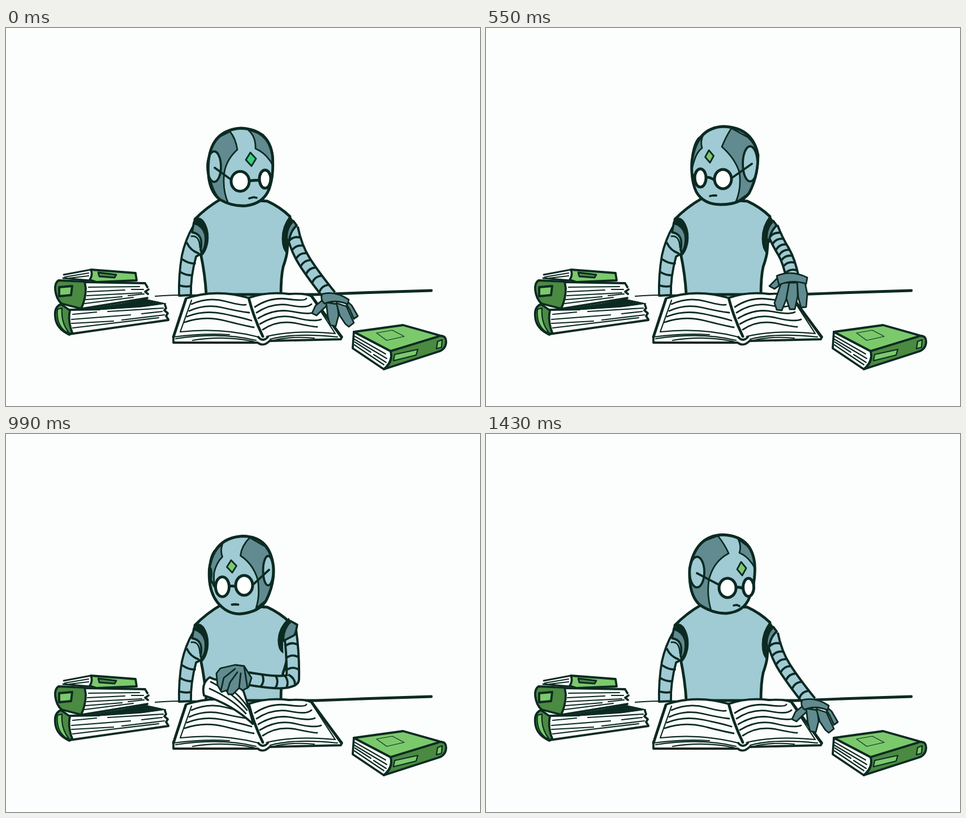
An HTML page that plays this animation: 838x668 px, repeating every 1.54 s.

```html
<!DOCTYPE html>
<html lang="en">
<head>
<meta charset="utf-8">
<title>Robot reading</title>
<style>
html, body { margin: 0; width: 100%; height: 100%; overflow: hidden; background: #fcfefd; }
svg { display: block; width: 100%; height: 100%; }
path, ellipse { fill: none; stroke: #0c2a22; stroke-width: 3.8; stroke-linecap: round; stroke-linejoin: round; }
.blue { fill: #a0cbd4; }
.teal { fill: #618b90; }
.lime { fill: #7cc96c; }
.moss { fill: #4b8a41; }
.paper { fill: #fcfefd; }
.lens { fill: #fff; stroke-width: 5; }
.ink { fill: #0c2a22; stroke-width: 1; }
.mid { stroke-width: 2.8; }
.fine { stroke-width: 2.2; }
.hair { stroke-width: 1.2; }
.bold { stroke-width: 4.8; }
.bare { stroke: none; }
.skin { stroke: #a0cbd4; }
</style>
</head>
<body>
<svg viewBox="0 0 838 668">
  <path class="fine" d="M264,474Q300,471 357,472"/>
  <path class="bold" d="M486,471L548,471Q650,467 752,464"/>

  <g id="stack">
    <path class="paper bare" d="M96,488L245,480L284,488L287,516L112,541L88,515Z"/>
    <path class="ink" d="M140,497L205,487L246,479L283,487L240,493L165,498Z"/>
    <path class="moss" d="M97,488Q85,493 87,510Q88,531 112,542L117,538Q109,518 113,499Z"/>
    <path class="lime fine" d="M91,497Q88,524 106,537L111,538Q97,521 99,495Z"/>
    <path d="M112,541L287,516M113,498L165,497M281,489L283,495L280,499L286,504L283,509L287,515"/>
    <path class="fine" d="M118,506L160,502M180,501L278,495M116,515L220,507M240,505L276,501M116,522L190,518M205,516L280,507M118,530L270,512"/>
    <path class="paper bare" d="M140,449L251,452L249,477L134,495Z"/>
    <path class="moss" d="M93,446Q86,450 87,463Q89,479 98,487L133,496Q141,478 141,460L139,448Z"/>
    <path class="lime" d="M94,458L117,456L115,472L94,474Z"/>
    <path d="M139,449L246,451M134,496L250,477M247,453L250,458M252,462L246,466L251,470"/>
    <path class="fine" d="M146,458L236,457M144,466L210,463M222,462L243,462M143,473L240,468M141,480L205,475M216,473L244,470M139,487L225,476"/>
    <path class="paper bare" d="M102,436L150,427L149,445L104,443Z"/>
    <path class="mid" d="M102,436L150,427M101,442L148,446"/>
    <path class="fine" d="M104,440L146,433M112,442L146,438"/>
    <path class="lime" d="M150,427L229,433L231,446L160,449L148,445Q154,436 150,427Z"/>
    <path class="moss mid" d="M163,432L195,436L192,441L165,439Z"/>
  </g>

  <g id="side-book">
    <path class="paper" d="M615,537L680,571Q685,588 668,603L613,566Z"/>
    <path class="fine" d="M617,545L671,576M616,550L673,584M617,555L645,573M650,577L672,591M616,560L668,595"/>
    <path class="lime" d="M615,537L702,525L769,544L680,571Z"/>
    <path class="hair" d="M655,539L683,534L704,545L673,552Z"/>
    <path class="moss" d="M680,571L768,544Q779,544 778,556Q777,568 764,572L668,603Q685,590 680,571Z"/>
    <path class="lime fine" d="M687,577L728,568L725,578L685,588ZM763,554L771,551L770,564L761,567Z"/>
  </g>

  <path class="blue bold" d="M382,301Q354,317 334,338L344,398Q352,435 354,471L486,471Q486,440 490,422Q496,405 497,395L502,333Q484,316 462,306Z"/>
  <g id="rest-arm">
    <path class="blue" d="M331,350Q317,374 311,402Q305,436 306,473L327,472Q326,440 336,404L346,398Q357,380 352,360Q345,346 331,350Z"/>
    <path class="teal" d="M332,344Q352,350 354,368Q354,386 346,397L344,392Q350,364 329,361Z"/>
    <path class="mid" d="M328,368Q342,366 343,388"/>
    <path class="ink" d="M333,337Q346,331 353,347Q360,362 357,380Q354,395 347,402Q353,380 351,366Q347,350 331,346Z"/>
    <path d="M320,380Q326,393 340,398M312,409Q324,417 334,416M308,431Q317,437 328,437M307,455Q317,458 327,456"/>
  </g>

  <g id="head"></g>

  <g id="open-book">
    <path class="paper" d="M318,478Q372,460 429,477Q462,465 500,470Q532,468 541,475L594,546L592,550L466,553Q455,564 445,556L296,556L296,546Z"/>
    <path class="fine" d="M328,481L308,537Q380,529 446,546M541,477L582,540Q510,533 461,545M300,549Q380,537 442,552M330,552Q385,543 438,554M467,550Q510,538 586,546M470,553Q500,544 545,548M296,546Q350,539 395,542"/>
    <path class="bold" d="M318,479L296,546M541,475L593,546M429,477Q438,512 454,545"/>
    <path d="M446,546Q454,556 463,546"/>
    <path class="mid" d="M328,488Q358,475 388,483T424,489M324,500Q352,487 382,494T430,503M320,510Q350,498 384,505T434,517M316,520Q350,508 386,517T438,529"/>
    <path class="mid" d="M440,493Q467,475 498,479T531,478M443,503Q472,484 502,490T540,488M446,513Q475,495 506,501T546,502M449,523Q480,504 512,512T557,515M454,533Q480,515 514,522T550,528"/>
  </g>

  <g id="arm"></g>
</svg>

<script>
const TICK = 110, STEPS = 14;
const nums = s => s.match(/-?[\d.]+/g).map(Number);
const lerp = (a, b, t) => a + (b - a) * t;

// Blends the numbers of two strings that share one layout.
function mix(a, b, t) {
  const to = nums(b);
  let i = 0;
  return a.replace(/-?[\d.]+/g, n => +lerp(+n, to[i++], t).toFixed(1));
}

// outline | left patch | right patch | ears | lenses | temples | gem | mouth
const HEADS = {
  right: `M416,177Q364,180 358,235Q354,285 378,303Q400,316 425,314Q455,310 465,285Q474,260 471,225Q465,180 416,177Z
|M372,195L396,183Q406,195 409,215Q390,232 386,255Q382,285 393,310L378,303Q358,280 358,235Q360,210 372,195Z
|M454,188L428,180Q442,192 441,213Q456,220 464,231Q469,236 471,242L472,240Q473,225 470,218Q466,200 454,188Z
|368 245 12 27|471 245 0 0|414 271 16 17.5|458 267 10 16|M369,247L398,268M468,262L470,261|433 232 9 12|M430,301L438,299L443,300`,
  front: `M418,174Q366,178 363,235Q362,285 382,303Q400,316 420,316Q450,314 464,293Q481,262 479,230Q474,178 418,174Z
|M374,198L398,181Q394,197 397,213Q380,228 376,255Q374,280 382,303L374,295Q360,270 363,235Q364,212 374,198Z
|M466,196L436,178Q430,195 431,212Q452,228 458,255Q461,280 456,301L466,290Q481,262 479,230Q477,210 466,196Z
|367 245 3 21|474 243 5 24|394 268 14 17|435 267 15 17|M366,258L379,264M452,264L474,243|412 234 9 12|M411,301L415,300L420,301`,
  left: `M420,174Q372,176 364,235Q362,270 372,290Q385,312 415,312Q450,312 465,292Q481,262 481,225Q472,176 420,174Z
|M375,195L385,187Q378,200 382,212Q372,220 368,235Q366,240 365,246L364,240Q364,228 365,222Q368,204 375,195Z
|M463,193L434,177Q424,192 417,210Q440,230 448,255Q452,285 441,309L465,292Q481,262 481,225Q478,207 463,193Z
|365 245 0 0|467 240 13 31|379 265 10 16|419 267 15 17|M367,260L368,260M436,264L470,240|395 227 7.5 11|M396,297L401,296L407,296`,
  down: `M420,181Q370,183 360,235Q356,265 366,290Q380,317 408,317Q448,314 460,292Q473,262 471,235Q465,181 420,181Z
|M364,213L368,205Q365,212 369,219Q364,225 362,234Q361,238 360,242L360,238Q360,228 361,224Q362,218 364,213Z
|M455,198L428,182Q405,195 399,217Q425,232 434,260Q438,290 429,314L460,292Q473,262 471,235Q468,212 455,198Z
|361 245 0 0|458 239 12 27|373 270 10 17|408 268 15 18|M361,264L362,264M425,266L462,240|387 235 8 10|M390,300L394,299L398,300`,
  turn: `M418,180Q366,182 359,240Q358,285 380,303Q400,319 418,319Q448,316 460,296Q476,268 475,238Q470,182 418,180Z
|M372,200L397,185Q392,200 396,215Q380,230 374,255Q372,285 380,304L372,295Q357,270 359,238Q361,213 372,200Z
|M462,200L434,184Q428,200 430,213Q450,228 457,258Q460,285 455,302L464,292Q476,268 475,238Q473,215 462,200Z
|362 250 3 20|469 244 6 25|392 270 14 18|434 267 15 17|M363,258L377,266M451,264L468,240|411 233 9 12|M409,303L416,303L423,303`,
  follow: `M416,181Q368,183 361,240Q358,285 378,302Q400,317 425,317Q455,314 465,292Q476,265 473,230Q466,181 416,181Z
|M380,196L402,185Q412,195 417,208Q397,222 391,255Q388,285 398,313L378,302Q358,280 361,240Q364,215 380,196Z
|M459,197L450,191Q454,200 455,207Q463,211 467,218Q470,222 472,228L472,226Q471,216 469,213Q465,203 459,197Z
|372 245 10 27|473 245 0 0|425 269 16 17|460 265 9 16|M371,247L409,264M470,261L471,260|447 234 7 11|M439,302L443,301L448,302`,
  settle: `M418,178Q370,180 360,238Q358,285 378,302Q400,317 425,317Q457,314 466,288Q477,262 475,230Q470,180 418,178Z
|M383,190L410,180Q422,195 429,211Q402,225 394,258Q390,285 398,312L378,302Q358,280 360,238Q366,205 383,190Z
|M462,198L446,186Q452,198 448,210Q460,215 468,226Q473,231 475,238L475,234Q475,222 472,215Q468,204 462,198Z
|373 244 13 27|476 245 0 0|427 272 15 17|464 271 9.5 16|M373,246L411,266M473,266L474,265|452 238 8 12|M438,303L443,302L448,304`
};

// Two joined quadratics from shoulder to wrist.
const ARMS = {
  out: '505 353 512 388 528 413 544 438 573 474',
  near: '505 352 514 376 526 395 536 412 542 442',
  across: '501 346 500 385 496 415 490 451 380 451',
  lift: '503 348 516 395 518 452 500 437 474 413',
  lay: '505 353 509 385 520 405 532 428 556 453'
};

const HANDS = {
  out: ['M563,478L547,491L541,504L549,508L557,500L568,490Z', 'M566,485L569,510L573,525L583,527L588,508L586,488Z',
    'M584,486L590,508L600,523L606,528L615,521L602,492Z', 'M598,482L608,498L615,514L622,509L611,490L602,482Z',
    'M559,470Q582,464 606,480L604,488Q582,479 563,487Q555,480 559,470Z'],
  near: ['M520,437L501,456L510,461L524,451Z', 'M522,450L510,486L514,498L523,499L533,474L537,450Z',
    'M536,450L531,478L537,497L546,497L551,474L551,450Z', 'M550,448L552,476L557,494L566,493L568,470L563,445Z',
    'M514,438Q540,427 568,441L566,452Q540,444 518,454Z'],
  across: ['M346,431L313,444L306,466L314,480L322,460L345,447Z', 'M348,433L328,449L320,472L323,487L331,488L340,468L356,450Z',
    'M352,435L346,455L337,473L341,483L348,482L360,466L368,450Z', 'M345,431Q366,428 385,439L381,464Q369,467 357,467L364,450Z'],
  lift: ['M426,395L452,389L468,391L481,412L476,428L466,434L459,430L448,441L440,441L437,434L428,437L421,425L419,404Z',
    'M452,396L432,412L427,434M456,402L443,420L438,436M462,404L459,430M468,392L474,430'],
  lay: ['M566,464L566,482L556,498L562,507L570,503L577,484L578,464Z', 'M552,462L548,482L538,500L546,509L556,506L566,486L569,464Z',
    'M541,460L533,478L527,492L535,501L543,498L552,480L558,462Z', 'M536,449L518,457L503,466L506,475L520,474L541,464Z',
    'M533,447Q556,444 578,457L577,469Q555,457 538,461Z']
};

// Shoulder shadow | shoulder cap, arm hanging outwards and arm reaching across.
const SOCKETS = [
  'M502,332L508,341Q499,350 497,362Q494,380 498,400Q488,392 488,372Q488,350 502,332Z|M508,341L514,349Q503,358 500,378L496,372Q496,352 508,341Z',
  'M499,324L504,330Q492,340 489,352Q487,368 488,384Q479,380 479,362Q480,340 499,324Z|M502,328L515,334Q515,350 512,350L489,364Q487,345 502,328Z'
];

// Outline and writing of the turning sheet.
const PAGES = {
  rise: ['M436,512Q400,478 350,462Q345,440 360,430Q380,440 400,432L420,455Q430,485 437,512Z',
    'M362,438Q402,458 426,488M378,440Q410,455 428,484M360,450Q400,468 424,494'],
  up: ['M436,512Q420,470 397,452Q390,425 403,417Q418,424 432,416L441,440Q436,480 437,512Z',
    'M405,426Q405,452 424,474M414,426Q412,455 430,482M423,426Q420,460 432,488M432,430Q426,460 434,482'],
  fall: ['M430,478Q455,455 490,457Q520,462 545,482L568,532Q510,511 480,518Q463,525 452,544Q445,505 430,478Z',
    'M440,492Q468,462 515,472M443,503Q474,475 525,485M446,514Q480,486 540,499M450,525Q485,500 548,512M500,517Q540,518 566,532']
};

// [head, next head, blend, arm, next arm, blend, hand, socket blend, page]
const still = (head, arm, socket, page) => [head, head, 0, arm, arm, 0, arm, socket, page];
const POSES = [
  still('right', 'out', 0),
  ['right', 'front', .5, 'out', 'out', 0, 'out', 0],
  still('front', 'out', 0),
  still('left', 'out', 0),
  still('left', 'out', 0),
  still('left', 'near', 0),
  ['left', 'down', .35, 'near', 'across', .33, 'near', .33],
  ['left', 'down', .7, 'near', 'across', .67, 'across', .67],
  still('down', 'across', 1),
  ['down', 'turn', .5, 'across', 'lift', .5, 'lift', .8, 'rise'],
  still('turn', 'lift', .55, 'up'),
  still('follow', 'lay', 0, 'fall'),
  ['follow', 'settle', .5, 'lay', 'out', .5, 'lay', 0],
  still('settle', 'out', 0)
];

const path = (d, cls = '', style = '') => `<path class="${cls}" d="${d}" style="${style}"/>`;
function oval(s, cls) {
  const [x, y, rx, ry] = nums(s);
  return rx ? `<ellipse class="${cls}" cx="${x}" cy="${y}" rx="${rx}" ry="${ry}"/>` : '';
}

function drawHead(spec, bright) {
  const [skull, patchL, patchR, earL, earR, lensL, lensR, temples, gem, mouth] = spec.split('|');
  const a = nums(lensL), b = nums(lensR), [x, y, w, h] = nums(gem);
  const from = a[0] + a[2], to = b[0] - b[2];
  const bridge = `M${from},${a[1] - 1}Q${(from + to) / 2},${a[1] - 2} ${to},${b[1] + 2}`;
  const diamond = `M${x - 1},${y - h}L${x + w},${y - 1}L${x + 1},${y + h}L${x - w},${y + 1}Z`;
  return path(skull, 'blue') + path(patchL, 'teal mid') + path(patchR, 'teal mid') +
    oval(earL, 'blue') + oval(earR, 'blue') + path(skull, 'bold') +
    path(temples) + path(bridge, 'bold') + oval(lensL, 'lens') + oval(lensR, 'lens') +
    path(diamond, 'lime mid', bright ? 'fill:#35cf80' : '') + path(mouth);
}

function drawTube(p) {
  const d = `M${p[0]},${p[1]}Q${p.slice(2, 6)}Q${p.slice(6)}`;
  let out = path(d, '', 'stroke-width:26;stroke-linecap:butt') +
    path(d, 'skin', 'stroke-width:18;stroke-linecap:butt');
  for (let u = .3; u < 1.9; u += .25) {
    const i = u < 1 ? 0 : 4, t = u % 1, s = 1 - t;
    const at = j => s * s * p[i + j] + 2 * s * t * p[i + 2 + j] + t * t * p[i + 4 + j];
    const slope = j => s * (p[i + 2 + j] - p[i + j]) + t * (p[i + 4 + j] - p[i + 2 + j]);
    const x = at(0), y = at(1), len = Math.hypot(slope(0), slope(1));
    const tx = slope(0) / len, ty = slope(1) / len;
    out += path(`M${x - ty * 10},${y + tx * 10}Q${x - tx * 6},${y - ty * 6} ${x + ty * 10},${y - tx * 10}`);
  }
  return out;
}

function drawArm([, , , from, to, t, hand, socket, page]) {
  const p = nums(mix(ARMS[from], ARMS[to], t)), rest = nums(ARMS[hand]);
  const [hollow, cap] = mix(...SOCKETS, socket).split('|');
  const fingers = HANDS[hand].map(d => path(d, d.endsWith('Z') ? 'teal mid' : 'mid')).join('');
  const sheet = page ? path(PAGES[page][0], 'paper') + path(PAGES[page][1], 'mid') : '';
  return drawTube(p) + path(cap, 'teal') + path(hollow, 'ink') + sheet +
    `<g transform="translate(${p[8] - rest[8]} ${p[9] - rest[9]})">${fingers}</g>`;
}

const headLayer = document.getElementById('head');
const armLayer = document.getElementById('arm');
const start = performance.now();
let shown = -1;

function render() {
  const step = Math.floor((performance.now() - start) / TICK) % STEPS;
  if (step !== shown) {
    const pose = POSES[step];
    headLayer.innerHTML = drawHead(mix(HEADS[pose[0]], HEADS[pose[1]], pose[2]), step === 0);
    armLayer.innerHTML = drawArm(pose);
    shown = step;
  }
  requestAnimationFrame(render);
}
render();
</script>
</body>
</html>
```
